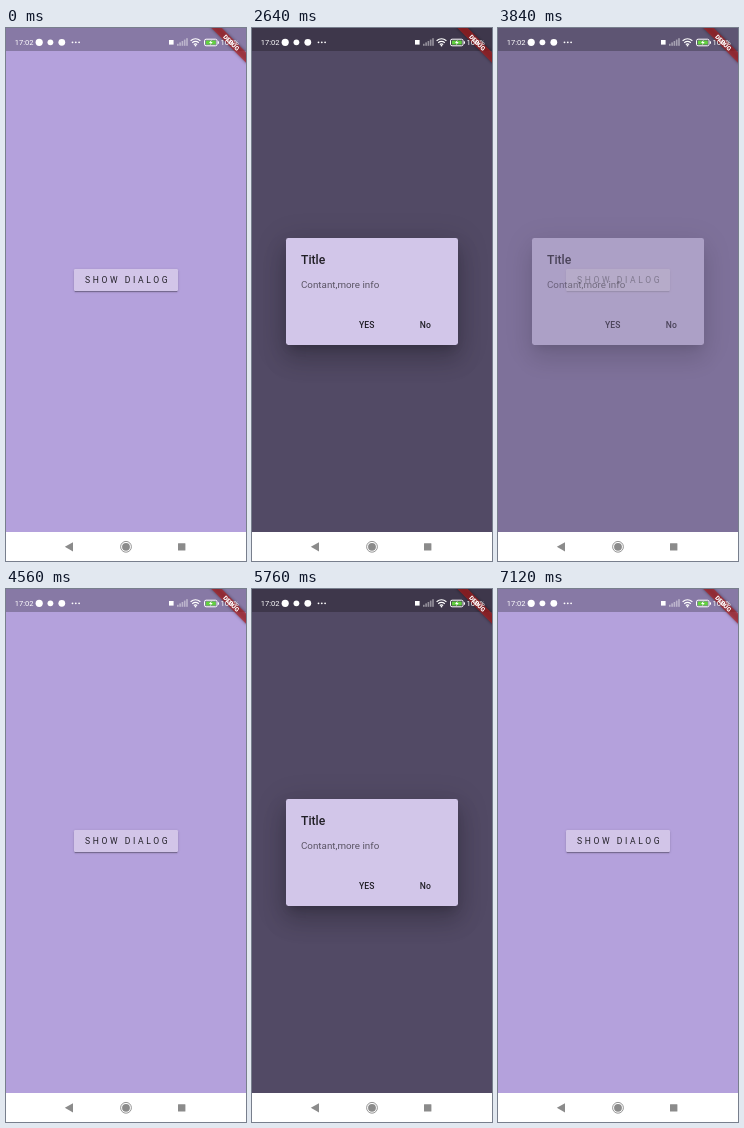
Recreate the animation shown at these times as an HTML page. Size 240 by 533 pixels, loop 8640 ms.

```html
<!DOCTYPE html>
<html lang="en">
<head>
<meta charset="utf-8">
<title>Dialog demo</title>
<style>
  html, body { margin: 0; width: 100%; height: 100%; overflow: hidden; background: #fff; }
  #stage { position: relative; width: 240px; height: 533px; overflow: hidden; background: #fff;
    font-family: Roboto, "Open Sans", sans-serif; color: #211f26; }
  #stage div, #stage span, #stage svg { position: absolute; }
  span { line-height: 20px; white-space: nowrap; }
  #app { left: 0; top: 0; width: 240px; height: 504px; overflow: hidden; background: #b4a1dc; }
  #status { left: 0; top: 0; width: 240px; height: 22.7px; background: rgba(0, 0, 0, .25); }
  #button { left: 68px; top: 241px; width: 103.5px; height: 22px; border-radius: 1.2px; background: #d2c5e8;
    box-shadow: 0 1.8px .6px -1.2px rgba(0,0,0,.2), 0 1.2px 1.2px rgba(0,0,0,.14), 0 .6px 3px rgba(0,0,0,.12); }
  #button span { left: 11px; top: 1.2px; font-size: 8.57px; letter-spacing: 2.6px; }
  #barrier { left: 0; top: 0; width: 240px; height: 504px; background: rgba(0, 0, 0, .54); }
  #dialog { left: 34.3px; top: 210px; width: 171.4px; height: 107px; border-radius: 2.4px; background: #d2c6e9;
    box-shadow: 0 6.7px 9.2px -4.3px rgba(0,0,0,.2), 0 14.7px 23.3px 1.8px rgba(0,0,0,.14),
      0 5.5px 28.2px 4.9px rgba(0,0,0,.12); }
  .title { left: 14.7px; top: 12.2px; font-size: 12.2px; font-weight: 500; }
  .body { left: 14.7px; top: 37px; font-size: 9.8px; color: #5a5464; }
  .action { top: 77px; font-size: 8.57px; font-weight: 500; }
  #icons { left: 0; top: 0; }
</style>
</head>
<body>
<div id="stage">
  <div id="app">
    <div id="status"></div>
    <div id="button"><span>SHOW DIALOG</span></div>
    <div id="barrier"></div>
    <div id="dialog">
      <span class="title">Title</span>
      <span class="body">Contant,more info</span>
      <span class="action" style="left:72.8px">YES</span>
      <span class="action" style="left:133.5px">No</span>
    </div>
  </div>
  <svg id="icons" width="240" height="533" viewBox="0 0 240 533">
    <defs>
      <filter id="soft" x="-20%" y="-100%" width="140%" height="300%">
        <feGaussianBlur stdDeviation="1.4"/>
      </filter>
    </defs>

    <!-- debug ribbon -->
    <g transform="translate(225.3 14.7) rotate(45)">
      <rect x="-26" y="-3.7" width="52" height="7.4" fill="#000" opacity=".42" filter="url(#soft)"/>
      <rect x="-26" y="-3.7" width="52" height="7.4" fill="#b71c1c" opacity=".63"/>
      <text y="2.2" text-anchor="middle" font-size="6.2" font-weight="900" fill="#fff">DEBUG</text>
    </g>

    <!-- status bar -->
    <g fill="#fff">
      <text x="8.8" y="17.2" font-size="7.5">17:02</text>
      <circle cx="33.2" cy="14.3" r="3.6"/>
      <circle cx="44.4" cy="14.3" r="2.9"/>
      <circle cx="55.8" cy="14.3" r="3.4"/>
      <circle cx="66.5" cy="14.3" r=".9"/>
      <circle cx="69.8" cy="14.3" r=".9"/>
      <circle cx="73.1" cy="14.3" r=".9"/>
      <rect x="163" y="12" width="4.6" height="4.6"/>
      <g id="bars" opacity=".45"></g>
      <g fill="none" stroke="#fff" stroke-width="1.2">
        <path d="M184.6 12.7q4.9-3.9 9.8 0M186.2 14.7q3.3-2.6 6.6 0M187.8 16.5q1.7-1.3 3.4 0"/>
      </g>
      <circle cx="189.5" cy="17.6" r=".9"/>
      <rect x="198.5" y="11.2" width="12.6" height="6.6" rx="1.6" fill="none" stroke="#fff"/>
      <rect x="199.8" y="12.5" width="10" height="4" rx=".5" fill="#62d13f"/>
      <path d="M205.6 11.8l-2.6 3.1h1.7l-.7 2.4 2.7-3.2h-1.7z"/>
      <rect x="212" y="13.2" width="1" height="2.6" rx=".4"/>
      <text x="214.6" y="17.2" font-size="7.5">100%</text>
    </g>

    <!-- navigation bar -->
    <g fill="#8b8b8b">
      <path d="M58.8 518.8l8.2-4.6v9.2z"/>
      <circle cx="120" cy="518.8" r="3.9"/>
      <circle cx="120" cy="518.8" r="5.4" fill="none" stroke="#8b8b8b" stroke-width=".9"/>
      <rect x="172" y="515.2" width="7.4" height="7.4" rx=".4"/>
    </g>
  </svg>
</div>
<script>
  const LOOP = 8640, TICK = 80;

  // [time in ms, dialog visibility]
  const FADE = [
    [0, 0], [1360, 0], [1440, 1], [3680, 1], [3920, 0],
    [4640, 0], [4880, 1], [6560, 1], [6880, 0], [LOOP, 0]
  ];

  const $ = id => document.getElementById(id);
  const easeOut = p => 1 - (1 - p) ** 2;

  $("bars").innerHTML = [0, 1, 2, 3, 4].map(i => {
    const h = 2 + i * 1.4;
    return `<rect x="${171 + i * 2.3}" y="${17.8 - h}" width="1.6" height="${h}"/>`;
  }).join("");

  function visibility(t) {
    const i = FADE.findIndex(([end]) => t < end);
    const [t0, v0] = FADE[i - 1], [t1, v1] = FADE[i];
    return v0 + (v1 - v0) * (t - t0) / (t1 - t0);
  }

  function draw(now) {
    const t = Math.floor(now % LOOP / TICK) * TICK;
    const shown = easeOut(visibility(t));
    $("barrier").style.opacity = shown;
    $("dialog").style.opacity = shown;
  }

  const start = performance.now();
  function frame() {
    draw(performance.now() - start);
    requestAnimationFrame(frame);
  }
  frame();
</script>
</body>
</html>
```
